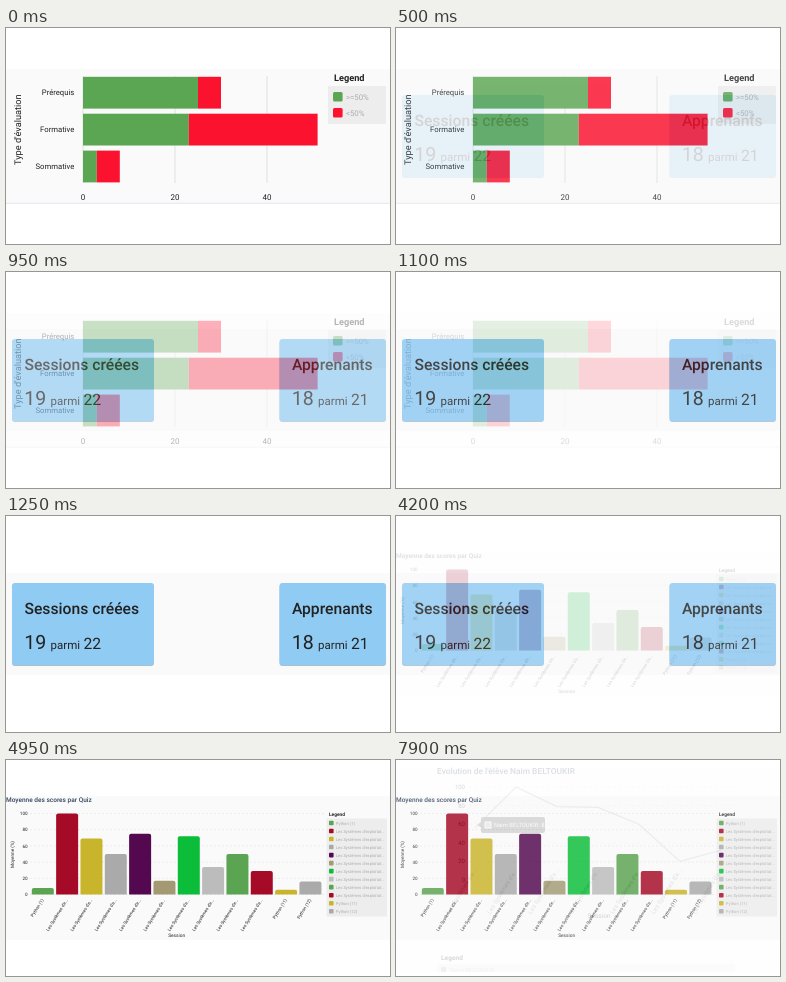
An HTML page that plays this animation: 384x216 px, repeating every 8 s.

```html
<!DOCTYPE html>
<html lang="fr">
<head>
<meta charset="utf-8">
<style>
  html, body { margin: 0; width: 100%; height: 100%; overflow: hidden; background: #fff; }
  svg { display: block; width: 100%; height: 100%; }
  text { font-family: Roboto, Arial, sans-serif; text-rendering: geometricPrecision; }
</style>
</head>
<body>
<svg id="stage" viewBox="0 0 384 216"></svg>
<script>
const LOOP = 8000, STEP = 150, FADE_STEPS = 6;
const GREEN = '#5ba653', RED = '#fb122f', INK = '#222', MUTED = '#acacac', NAVY = '#34435e';
const STUDENT = 'Naim BELTOUKIR';

const rect = (x, y, w, h, fill, r = 0, extra = '') =>
  `<rect x="${x}" y="${y}" width="${w}" height="${h}" rx="${r}" fill="${fill}" ${extra}/>`;
const line = (x1, y1, x2, y2, stroke, width = 1, dash = 'none') =>
  `<path d="M${x1} ${y1}L${x2} ${y2}" stroke="${stroke}" stroke-width="${width}" stroke-dasharray="${dash}"/>`;
const text = (s, x, y, size, { fill = INK, anchor = 'start', weight = 400, turn = 0 } = {}) =>
  `<text transform="translate(${x} ${y}) rotate(${turn})" font-size="${size}" fill="${fill}"
    text-anchor="${anchor}" font-weight="${weight}">${s.replace(/</g, '&lt;').replace(/>/g, '&gt;')}</text>`;
const scene = (top, height, content) =>
  `<g>${rect(0, 0, 384, 216, '#fff')}${rect(0, top, 384, height, '#fafafa')}${content}</g>`;

function evaluationTypes() {
  const x0 = 77, unit = 4.6;
  let out = line(0, 175.3, 384, 175.3, '#e3e6ee');
  for (const v of [0, 20, 40]) {
    const x = x0 + v * unit;
    out += line(x, 48, x, 155, '#dedede', 0.9) + text(`${v}`, x, 172, 8, { anchor: 'middle' });
  }
  [['Prérequis', 25, 5], ['Formative', 23, 28], ['Sommative', 3, 5]].forEach(([name, high, low], i) => {
    const y = 48.8 + i * 36.9;
    out += rect(x0, y, high * unit, 31.8, GREEN) + rect(x0 + high * unit, y, low * unit, 31.8, RED)
      + text(name, 68.3, y + 18.3, 7.7, { anchor: 'end' });
  });
  out += text("Type d'évaluation", 15, 101.7, 9.2, { anchor: 'middle', turn: -90 })
    + text('Legend', 328, 53.3, 9.2, { weight: 700 })
    + rect(322, 58, 58, 38, '#ededed');
  [['>=50%', GREEN], ['<50%', RED]].forEach(([label, color], i) => {
    out += rect(327, 64 + i * 16, 9.6, 9.6, color, 1.5)
      + text(label, 340, 71.6 + i * 16, 7.8, { fill: MUTED });
  });
  return scene(41, 134, out);
}

function totals() {
  const card = (x, w, title, count, total) =>
    rect(x, 68, w, 82, '#a9bfcf', 3) + rect(x, 67, w, 82, '#90cbf4', 3)
    + text(title, x + 12.4, 97.6, 15.7, { weight: 500 })
    + text(count, x + 12.2, 132.5, 19.6)
    + text('parmi', x + 38.6, 132.5, 11.5)
    + text(total, x + 71.4, 132.5, 15.7);
  return scene(57, 102, card(6, 142, 'Sessions créées', '19', '22') + card(273.5, 106.5, 'Apprenants', '18', '21'));
}

function quizScores() {
  const base = 134.5, unit = 0.81, pitch = 24.33, barWidth = 22;
  const scores = [8, 100, 69, 50, 75, 17, 72, 34, 50, 29, 6, 16];
  const palette = ['#5ba452', '#a50b26', '#c9b52b', '#aaaaaa', '#53084f', '#a39a74', '#0bbd38', '#bcbcbc'];
  let out = text('Moyenne des scores par Quiz', 0, 42.3, 6.5, { fill: NAVY, weight: 500 });
  for (let v = 0; v <= 100; v += 20) {
    const y = base - v * unit;
    out += line(24, y, 318, y, '#dcdcdc', 0.5, '2 2') + text(`${v}`, 21.6, y + 1.6, 4.6, { anchor: 'end' });
  }
  out += rect(320.5, 58.5, 60.5, 98, '#ededed');
  scores.forEach((score, i) => {
    const x = 25.8 + i * pitch, h = score * unit, color = palette[i % 8];
    const python = i === 0 || i > 9 ? `Python (${i + 1})` : '';
    const rowY = 60.7 + i * 8.02;
    out += `<path d="M${x} ${base}v${2 - h}q0-2 2-2h${barWidth - 4}q2 0 2 2v${h - 2}z" fill="${color}"/>`
      + text(python || "Les Systèmes d'e...", x + barWidth / 2 + 1, 140, 4.4, { anchor: 'end', turn: -58 })
      + rect(323, rowY, 4.6, 4.6, color, 0.8)
      + text(python || "Les Systèmes d'exploitat...", 329.8, rowY + 3.9, 4.15, { fill: MUTED });
  });
  out += text('Moyenne (%)', 8, 94.5, 4.7, { anchor: 'middle', turn: -90 })
    + text('Session', 170.6, 177.3, 4.8, { anchor: 'middle' })
    + text('Legend', 323, 55.6, 4.8, { weight: 700 });
  return scene(36, 144, out);
}

function studentProgress() {
  const x0 = 79, pitch = 41, base = 120, unit = 0.93;
  const scores = [56, 100, 79, 78, 60, 20, 32];
  const points = scores.map((v, i) => [x0 + i * pitch, base - v * unit]);
  let out = text(`Evolution de l'élève ${STUDENT}`, 41, 13.6, 8.4, { fill: NAVY, weight: 500 });
  for (let v = 0; v <= 100; v += 20) {
    const y = base - v * unit;
    out += line(73, y, 339, y, '#dcdcdc', 0.6, '3 3') + text(`${v}`, 69, y + 2, 6, { anchor: 'end' });
  }
  points.forEach(([x]) => {
    out += text("Les Systèmes d'e...", x + 2, 110, 6.2, { anchor: 'end', turn: -58, fill: '#777' });
  });
  out += `<polyline points="${points.join(' ')}" fill="none" stroke="#aaa" stroke-width="1.2"/>`
    + '<path d="M81.500 65l4-3v6z" fill="#444"/>' + rect(85, 57, 64, 16, '#444', 2)
    + rect(89, 62, 6, 6, '#aaa', 0, 'stroke="#fff"')
    + text(`${STUDENT}: 8`, 98, 67, 5.8, { fill: '#fff' })
    + text('Session', 203, 158, 6.5, { anchor: 'middle' })
    + text('Legend', 45, 200, 6.6, { weight: 700 })
    + rect(41, 204, 298, 8, '#ededed') + rect(45, 207, 5, 5, '#aaa', 1)
    + text(STUDENT, 54, 211.5, 5.8, { fill: MUTED });
  return scene(7, 205, out);
}

const stage = document.getElementById('stage');
stage.innerHTML = evaluationTypes() + totals() + quizScores() + studentProgress();
const fadeStarts = [-LOOP, 500, 4200, 7900];
const scenes = [...stage.children];

// Every dissolve advances in six equal, hard steps.
function draw(t) {
  scenes.forEach((el, i) => {
    const step = Math.floor((t - fadeStarts[i]) / STEP) + 1;
    el.setAttribute('opacity', Math.max(0, Math.min(FADE_STEPS, step)) / FADE_STEPS);
  });
}

const start = performance.now();
function tick() {
  draw((performance.now() - start) % LOOP);
  requestAnimationFrame(tick);
}
tick();
</script>
</body>
</html>
```
